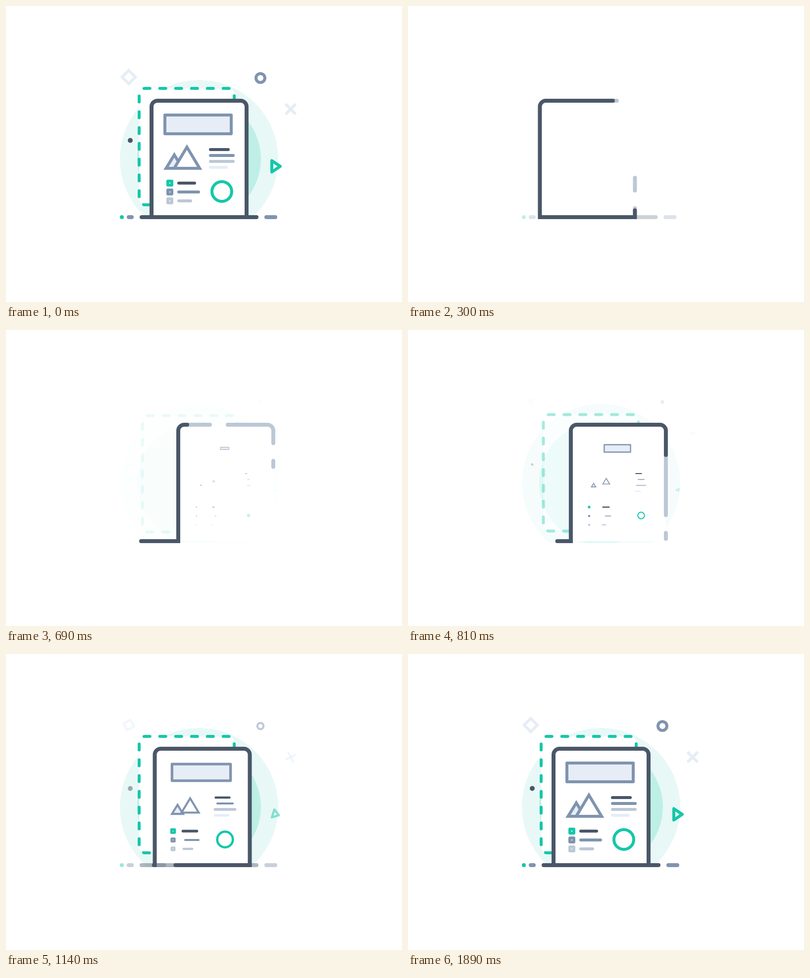
An HTML page with a canvas for the animation above (2.25 s loop, 800 by 600 pixels).

```html
<!DOCTYPE html>
<html lang="en">
<head>
<meta charset="utf-8">
<title>Page icon loop</title>
<style>
html, body { margin: 0; width: 100%; height: 100%; overflow: hidden; background: #fff; }
canvas { display: block; }
</style>
</head>
<body>
<canvas id="stage" width="800" height="600"></canvas>
<script>
const ctx = document.getElementById('stage').getContext('2d');
const LOOP = 2250, STEP = 30, SWAP = 570;
const DARK = '#4a5768', MID = '#8094af', LIGHT = '#bcc8d6', PALE = '#e6edf6', GREEN = '#16c7aa';

const clamp = v => Math.max(0, Math.min(1, v));
const ramp = (t, a, b) => clamp((t - a) / (b - a));
const smooth = u => u * u * (3 - 2 * u);
const easeOut = u => 1 - (1 - u) ** 2;
// What is left at time t of an amount that settles cubically at time end.
const settle = (t, amount, from, end) => amount * (Math.max(0, end - t) / (end - from)) ** 3;
// Leaving: k at 180 ms, falling with the square of time.
const leave = (t, k) => clamp(1 - (1 - k) * (t / 180) ** 2);

const leaving = t => t < SWAP;
const growth = (t, out, early) => leaving(t)
  ? leave(t, out)
  : easeOut(ramp(t, 640, 1800 - 400 * early));
const pageShift = t => leaving(t)
  ? -4.38e-4 * Math.max(0, t - 49) ** 2
  : settle(t, 54, 690, 1579);

function pen(color, width = 6, cap = 'round', join = 'round') {
  ctx.strokeStyle = color;
  ctx.lineWidth = width;
  ctx.lineCap = cap;
  ctx.lineJoin = join;
}

function line(x1, y1, x2, y2) {
  ctx.beginPath();
  ctx.moveTo(x1, y1);
  ctx.lineTo(x2, y2);
  ctx.stroke();
}

function poly(...pts) {
  ctx.beginPath();
  for (const [x, y] of pts) ctx.lineTo(x, y);
  ctx.closePath();
}

function disc(x, y, r, color) {
  ctx.fillStyle = color;
  ctx.beginPath();
  ctx.arc(x, y, r, 0, 2 * Math.PI);
  ctx.fill();
}

function ring(r, color) {
  pen(color);
  ctx.beginPath();
  ctx.arc(0, 0, r, 0, 2 * Math.PI);
  ctx.stroke();
}

function faded(alpha, draw) {
  if (alpha <= 0) return;
  ctx.save();
  ctx.globalAlpha = clamp(alpha);
  draw();
  ctx.restore();
}

function place(part, t, shift, turn) {
  const scale = growth(t, part.out, part.early);
  if (scale <= 0.005) return;
  ctx.save();
  ctx.translate(part.x + shift, part.y);
  ctx.rotate(turn * Math.PI / 180);
  ctx.scale(scale, scale);
  part.draw();
  ctx.restore();
}

function backdrop(t) {
  const fade = smooth(ramp(t, 600, 1100));
  faded(leaving(t) ? leave(t, 0.24) : fade, () => {
    ctx.beginPath();
    ctx.rect(0, 0, 800, 432);
    ctx.clip();
    disc(390, 310, 160, '#e8f8f6');
    disc(390, 310, 125, '#beefe6');
  });
  const shift = leaving(t) ? 3 * (t / 180) ** 2 : 7.2 * (1 - fade);
  faded(leaving(t) ? leave(t, 0.3) : fade, () => {
    ctx.translate(shift, shift);
    ctx.fillStyle = '#fff';
    ctx.beginPath();
    ctx.roundRect(269, 167, 192, 236, 12);
    ctx.fill();
    ctx.beginPath();
    ctx.moveTo(461, 386);
    ctx.arcTo(461, 167, 449, 167, 12);
    ctx.arcTo(269, 167, 269, 179, 12);
    ctx.arcTo(269, 403, 281, 403, 12);
    ctx.lineTo(449, 403);
    pen(GREEN);
    ctx.setLineDash([12, 20]);
    ctx.stroke();
  });
}

const bar = (x1, x2, y, color, out, early) => ({
  x: (x1 + x2) / 2, y, out, early,
  draw() {
    const h = (x2 - x1) / 2 - 3;
    pen(color);
    line(-h, 0, h, 0);
  }
});

const box = (y, color, out, early) => ({
  x: 331, y, out, early,
  draw() {
    pen(color);
    ctx.strokeRect(-4, -4, 8, 8);
  }
});

const peak = (x, y, half, top, bottom, fill, out) => ({
  x, y, out, early: 0,
  draw() {
    poly([0, top], [-half, bottom], [half, bottom]);
    ctx.fillStyle = fill;
    ctx.fill();
    pen(MID, 6, 'butt', 'miter');
    ctx.stroke();
  }
});

const banner = (out, draw) => ({ x: 388, y: 240, out, early: 1, draw });

const items = [
  banner(0.84, () => { ctx.fillStyle = PALE; ctx.fillRect(-67, -19, 134, 38); }),
  banner(0.68, () => { pen(MID); ctx.strokeRect(-67, -19, 134, 38); }),
  peak(340, 314, 16.6, -12.2, 15, PALE, 0.8),
  peak(365.5, 306, 25.7, -20, 23, '#fff', 0.85),
  bar(410, 452, 291, DARK, 0.79, 0.5),
  bar(410, 462, 303, MID, 0.83, 0),
  bar(410, 462, 315, LIGHT, 0.63, 1),
  bar(410, 448, 327, PALE, 0.8, 0.75),
  box(359, GREEN, 0.64, 0.75),
  box(377, MID, 0.9, 0.3),
  box(395, LIGHT, 0.5, 0.1),
  bar(346, 384, 359, DARK, 0.87, 1),
  bar(346, 392, 377, MID, 0.76, 0),
  bar(346, 376, 395, LIGHT, 0.85, 0.3),
  { x: 436, y: 376, out: 0.87, early: 0.6, draw() { ring(20, GREEN); } }
];

const decor = [
  { x: 248, y: 144, out: 0.82, early: 0.7, draw() {
    poly([0, -13.5], [13.5, 0], [0, 13.5], [-13.5, 0]);
    pen(PALE, 5.5, 'butt', 'miter');
    ctx.stroke();
  } },
  { x: 514, y: 146, out: 0.87, early: 0.1, draw() { ring(9, MID); } },
  { x: 575, y: 209, out: 0.75, early: 0.7, draw() {
    pen(PALE);
    line(-8.5, -8.5, 8.5, 8.5);
    line(8.5, -8.5, -8.5, 8.5);
  } },
  { x: 545.5, y: 325, out: 0.86, early: 0.3, draw() {
    poly([-8.5, -11.5], [-8.5, 11.5], [8.5, 0]);
    pen(GREEN);
    ctx.stroke();
  } },
  { x: 251, y: 272.5, out: 0.65, early: 1.4, draw() { disc(0, 0, 5, DARK); } }
];

function pageShape(left) {
  ctx.fillStyle = '#fff';
  ctx.beginPath();
  ctx.roundRect(left, 192, 192, 236, [12, 12, 0, 0]);
  ctx.fill();
}

function ground(t) {
  const pull = leaving(t) ? 2 * (t / 180) ** 2 : 0;
  faded(leaving(t) ? 1 - ramp(t, 190, 340) : ramp(t, 868, 1492), () => {
    disc(234, 428, 4, GREEN);
    pen(MID, 8);
    line(248, 428, 254, 428);
    line(526 - pull, 428, 544 - pull, 428);
    pen(DARK, 8);
    line(274, 428, 506 - pull, 428);
  });
}

// Lengths along the outline, clockwise from the bottom left corner.
const FOOT = 2 * 224 + 12 * Math.PI + 168, ROUND = FOOT + 192;

// Strokes the stretch a..b of the outline, which is laid twice so a stretch may wrap.
function trace(left, ext, [a, b], color) {
  if (b <= a) return;
  const right = left + 192;
  ctx.save();
  pen(color, 8, 'round', 'miter');
  ctx.beginPath();
  ctx.moveTo(left - ext, 428);
  for (let i = 0; i < 2; i++) {
    ctx.lineTo(left, 428);
    ctx.arcTo(left, 192, right, 192, 12);
    ctx.arcTo(right, 192, right, 428, 12);
    ctx.lineTo(right, 428);
  }
  ctx.lineTo(left, 428);
  ctx.setLineDash([b - a, 5000]);
  ctx.lineDashOffset = -(a + ext);
  ctx.stroke();
  ctx.restore();
}

// Dark stretch, the light pieces around it, and the dark overhang at the foot.
function outline(t) {
  if (leaving(t)) {
    const u = (t / (660 - t)) ** 2.1;
    const end = FOOT - 680 * u / (1 + u);
    const start = FOOT - 14 * Math.min(1, t / 300);
    const piece = FOOT - 42 * Math.sqrt(t / 180);
    const tail = Math.max(0, (t - 180) / 15);
    return {
      ext: 0,
      dark: [start, ROUND + end],
      light: t < STEP ? [] : [
        [Math.max(end, FOOT - 80), piece],
        [piece + 36, start],
        [ROUND + end, ROUND + end + tail]
      ]
    };
  }
  const full = ROUND + 16;
  const end = full - settle(t, 613, 690, 1517);
  const front = full - settle(t, 359, 690, 1441);
  const from = Math.max(0, end);
  const ext = 75 * Math.exp((690 - t) / 119);
  const piece = (a, b) => [Math.max(from, front - a), front - b];
  return {
    ext,
    dark: [-ext, end],
    light: end < ROUND ? [piece(12, 0), piece(172, 48), piece(ROUND, 208)] : []
  };
}

function render(t) {
  const shift = pageShift(t), left = 294 + shift;
  ctx.fillStyle = '#fff';
  ctx.fillRect(0, 0, 800, 600);
  backdrop(t);
  pageShape(left);

  // Content fades behind a white veil, so overlapping parts stay solid.
  for (const it of items) place(it, t, shift, 0);
  if (leaving(t)) faded(1 - leave(t, 0.62), () => pageShape(left));

  const { ext, dark, light } = outline(t);
  for (const part of light) trace(left, 0, part, LIGHT);
  ground(t);
  trace(left, ext, dark, DARK);

  const spin = leaving(t) ? 65 * (t / 180) ** 2 : settle(t, 44, 930, 1741);
  faded(leaving(t) ? leave(t, 0.6) : ramp(t, 405, 1890), () => {
    for (const it of decor) place(it, t, 0, spin);
  });
}

const begin = performance.now();
function tick() {
  const t = (performance.now() - begin) % LOOP;
  render(Math.floor(t / STEP) * STEP);
  requestAnimationFrame(tick);
}
tick();
</script>
</body>
</html>
```
